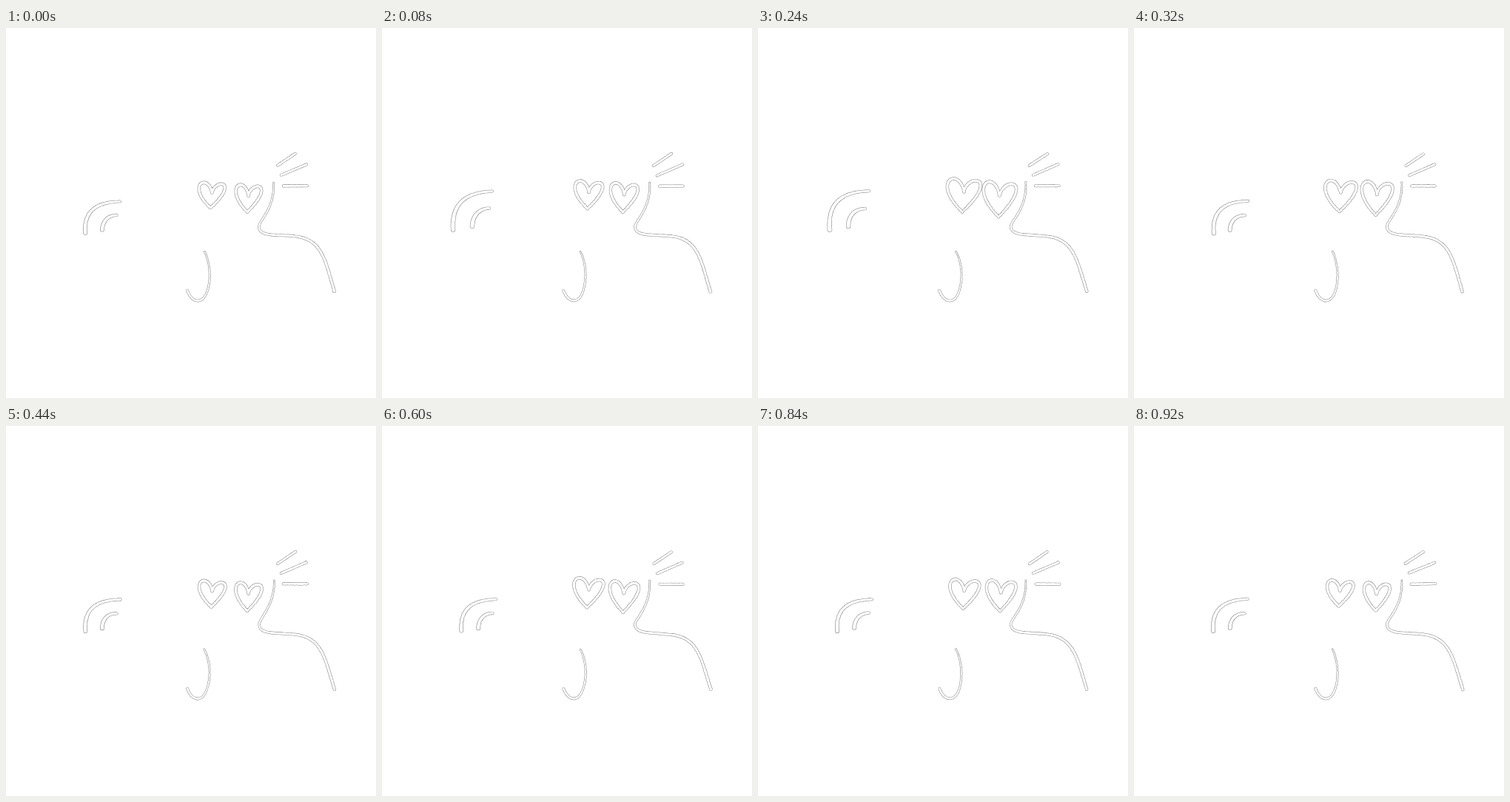
An HTML page with a canvas for the animation above (960 ms loop, 500x500 px).

```html
<!DOCTYPE html>
<html lang="en">
<head>
<meta charset="utf-8">
<style>
html, body { margin: 0; height: 100%; overflow: hidden; background: #fff; }
canvas { display: block; }
</style>
</head>
<body>
<canvas id="stage" width="500" height="500"></canvas>
<script>
const ctx = document.getElementById('stage').getContext('2d');
const LOOP = 960, STEP = 40, BEAT = 480, SWING = 320;

// Chains of cubic Bézier control points, one chain per pen stroke.
const tail = [
  [[107.5, 277], [105, 248], [121, 235], [154, 234]],
  [[130, 273], [130, 262], [137, 253], [150, 253]]
];
const mouth = [[268, 302], [277, 320], [277, 345], [270, 360], [264, 373], [251, 371], [245, 355]];
const body = [[362, 209], [363, 242], [345, 257], [342, 267], [341, 281], [362, 279],
  [382, 281], [427, 282], [430, 310], [444, 356]];
const heart = [[.5, .4], [.35, -.38], [-.5, .1], [.46, 1], [1.6, -.05], [.62, -.15], [.5, .4]];
const whiskers = [
  [[367, 186], [391, 170]],
  [[372, 199], [406, 184.5]],
  [[375, 213.5], [407, 213.5]]
];

let seed;
function shake(amount) {
  seed = (seed * 16807) % 2147483647;
  return (seed / 2147483647 - .5) * 2 * amount;
}

const mix = (a, b, k) => a.map((v, i) => v + (b[i] - v) * k);

// De Casteljau: shrink the control polygon to a single point.
function bezier(points, u) {
  while (points.length > 1)
    points = points.slice(1).map((p, i) => mix(points[i], p, u));
  return points[0];
}

// White tapered stroke with a thin, uneven grey rim.
function brush(points, from, to) {
  const chain = points.map(p => p.map(v => v + shake(.45)));
  const degree = Math.min(3, chain.length - 1), dots = [];
  for (let i = 0; i < chain.length - 1; i += degree) {
    const part = chain.slice(i, i + degree + 1);
    for (let u = 0; u <= 1; u += 1 / 64) {
      const k = (i + u * degree) / (chain.length - 1);
      dots.push([...bezier(part, u), (from + (to - from) * k) / 2 + shake(.2)]);
    }
  }
  for (const [color, rim] of [['#888', .3], ['#fff', -.25]]) {
    ctx.fillStyle = color;
    ctx.beginPath();
    for (const [x, y, r] of dots) {
      ctx.moveTo(x + r + rim, y);
      ctx.arc(x, y, r + rim, 0, 2 * Math.PI);
    }
    ctx.fill();
  }
}

function drawHeart(cx, cy, w, h) {
  const dx = cx + shake(1), dy = cy + shake(1);
  brush(heart.map(([x, y]) => [dx + (x - .5) * w, dy + (y - .5) * h]), 3.8, 3.8);
}

function draw(now) {
  const t = Math.floor(now % LOOP / STEP) * STEP;
  seed = 7919 * (t + 1);
  ctx.clearRect(0, 0, 500, 500);

  const lift = t < SWING ? Math.sin(Math.PI * t / SWING) : 0;
  const raise = ([x, y]) => mix([x, y], [1.2 * x - 37, 1.3 * y - 89], lift);
  for (const stroke of tail) brush(stroke.map(raise), 5 + lift, 3.4);

  const size = 40 - 5 * Math.cos(2 * Math.PI * t / BEAT);
  drawHeart(279, 226, size, size);
  drawHeart(327.5, 230, size - .5, size * 1.06);

  brush(mouth, 2, 3.2);
  brush(body, 2.2, 4);
  for (const stroke of whiskers) brush(stroke, 3.2, 3.2);
  requestAnimationFrame(() => draw(performance.now()));
}
draw(0);
</script>
</body>
</html>
```
